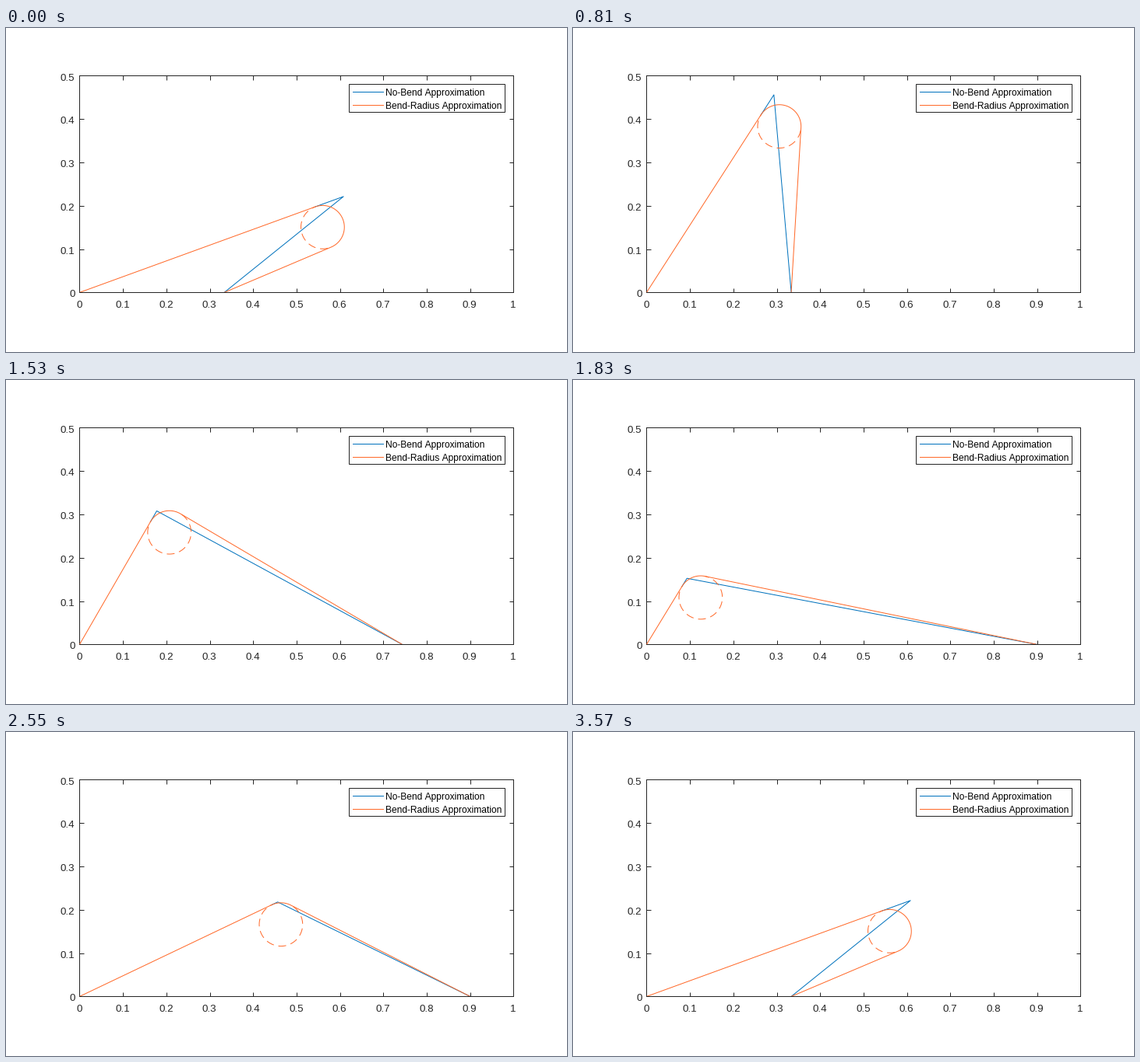
A matplotlib script that plays this animation: 720 px wide and 417 px high, repeating every 3600 ms.

```python
import numpy as np
import matplotlib.pyplot as plt
from matplotlib.animation import FuncAnimation
from matplotlib.patches import Rectangle

W, H, DPI = 720, 417, 96
PX = 72 / DPI                      # one pixel in points
# Just under the pixel centres, so that snapping does not round up
LEFT, RIGHT, TOP, BOTTOM = 94.4, 651.4, 61.4, 340.4
BLUE, ORANGE, INK = "#0072BD", "#FF6929", "#262626"

STEPS = 30                         # frames per phase
LENGTH, RADIUS = 1.0, 0.05         # strip length and bend radius
ANGLES = np.radians([20, 60])
BASES = (1 / 3, 0.9)
DASH = (10, 6)

plt.rcParams["font.family"] = "Liberation Sans"
plt.rcParams["text.kerning_factor"] = 6
plt.rcParams["path.simplify"] = False

fig = plt.figure(figsize=(W / DPI, H / DPI), dpi=DPI, facecolor="white")
ax = fig.add_axes([LEFT / W, 1 - BOTTOM / H, (RIGHT - LEFT) / W, (BOTTOM - TOP) / H])
ax.set(xlim=(0, 1), ylim=(0, 0.5))
ax.set_xticks(np.arange(11) / 10)
ax.set_yticks(np.arange(6) / 10)
ax.tick_params(direction="in", length=5.5 * PX, width=PX, color=INK, top=True,
               right=True, labelbottom=False, labelleft=False)
for spine in ax.spines.values():
    spine.set(linewidth=PX, edgecolor=INK)


def label(x, y, text, size, **kw):
    """Text with its baseline at pixel (x, y), measured from the top left."""
    fig.text(x / W, 1 - y / H, text, fontsize=size, va="baseline", **kw)


for i in range(11):
    x = LEFT - 0.5 + (RIGHT - LEFT) * i / 10
    label(x, 360.5, f"{i / 10:g}", 10, ha="center", color=INK)
for i in range(6):
    y = BOTTOM + 6.1 - (BOTTOM - TOP) * i / 5
    label(88.5, y, f"{i / 10:g}", 10, ha="right", color=INK)

# Legend, laid out in pixels
legend = fig.add_axes([0, 0, 1, 1], zorder=5)
legend.set(xlim=(0, W), ylim=(H, 0))
legend.axis("off")
legend.add_patch(Rectangle((440.4, 72.4), 200, 36, fc="white", ec=INK, lw=PX))
for y, color, name in ((82.4, BLUE, "No-Bend Approximation"),
                       (99.4, ORANGE, "Bend-Radius Approximation")):
    legend.plot([445, 484], [y, y], color=color, lw=PX)
    label(487, y + 4.7, name, 9, color="black", zorder=6)

sharp, = ax.plot([], [], color=BLUE, lw=PX, zorder=3)
bent, = ax.plot([], [], color=ORANGE, lw=PX, zorder=4)
circle, = ax.plot([], [], color=ORANGE, lw=PX, zorder=4, dash_capstyle="butt")


def unit(a):
    return np.array([np.cos(a), np.sin(a)])


def bend(t, angle, base):
    """Circle centre, turn and total length when the bend starts at distance t."""
    centre = t * unit(angle) + RADIUS * unit(angle - np.pi / 2)
    dx, dy = centre - (base, 0)
    dist = max(np.hypot(dx, dy), RADIUS)
    turn = angle - np.arctan2(dy, dx) + np.arcsin(RADIUS / dist) + np.pi
    total = t + RADIUS * turn + np.sqrt(dist**2 - RADIUS**2)
    return centre, turn, total


def solve_bend(angle, base):
    lo, hi = 0.0, LENGTH
    for _ in range(40):
        mid = (lo + hi) / 2
        if bend(mid, angle, base)[2] < LENGTH:
            lo = mid
        else:
            hi = mid
    return bend(lo, angle, base)[:2]


def arc_points(centre, start, end):
    return centre[:, None] + RADIUS * unit(np.linspace(start, end, 80))


def pose(frame):
    """Raise the angle, slide the base out, lower the angle, slide back."""
    phase, step = divmod(frame, STEPS)
    u = step / (STEPS - 1)
    a = (u, 1, 1 - u, 0)[phase]
    b = (0, u, 1, 1 - u)[phase]
    return ANGLES[0] + a * np.ptp(ANGLES), BASES[0] + b * (BASES[1] - BASES[0])


def draw(frame):
    angle, base = pose(frame)
    centre, turn = solve_bend(angle, base)
    start = angle + np.pi / 2
    end = start - turn
    arc = arc_points(centre, start, end)
    bent.set_data(np.r_[0, arc[0], base], np.r_[0, arc[1], 0])

    # The shared first part of both strips shows only in orange
    reach = (LENGTH**2 - base**2) / (2 * (LENGTH - base * np.cos(angle)))
    x, y = reach * unit(angle)
    sharp.set_data([arc[0, 0], x, base], [arc[1, 0], y, 0])

    # Dashes are counted from the circle's rightmost point
    circle.set_data(*arc_points(centre, start, end + 2 * np.pi))
    circle.set_linestyle((start * RADIUS * (RIGHT - LEFT), DASH))
    return sharp, bent, circle


anim = FuncAnimation(fig, draw, frames=4 * STEPS, interval=30, repeat=True)
plt.show()
```
